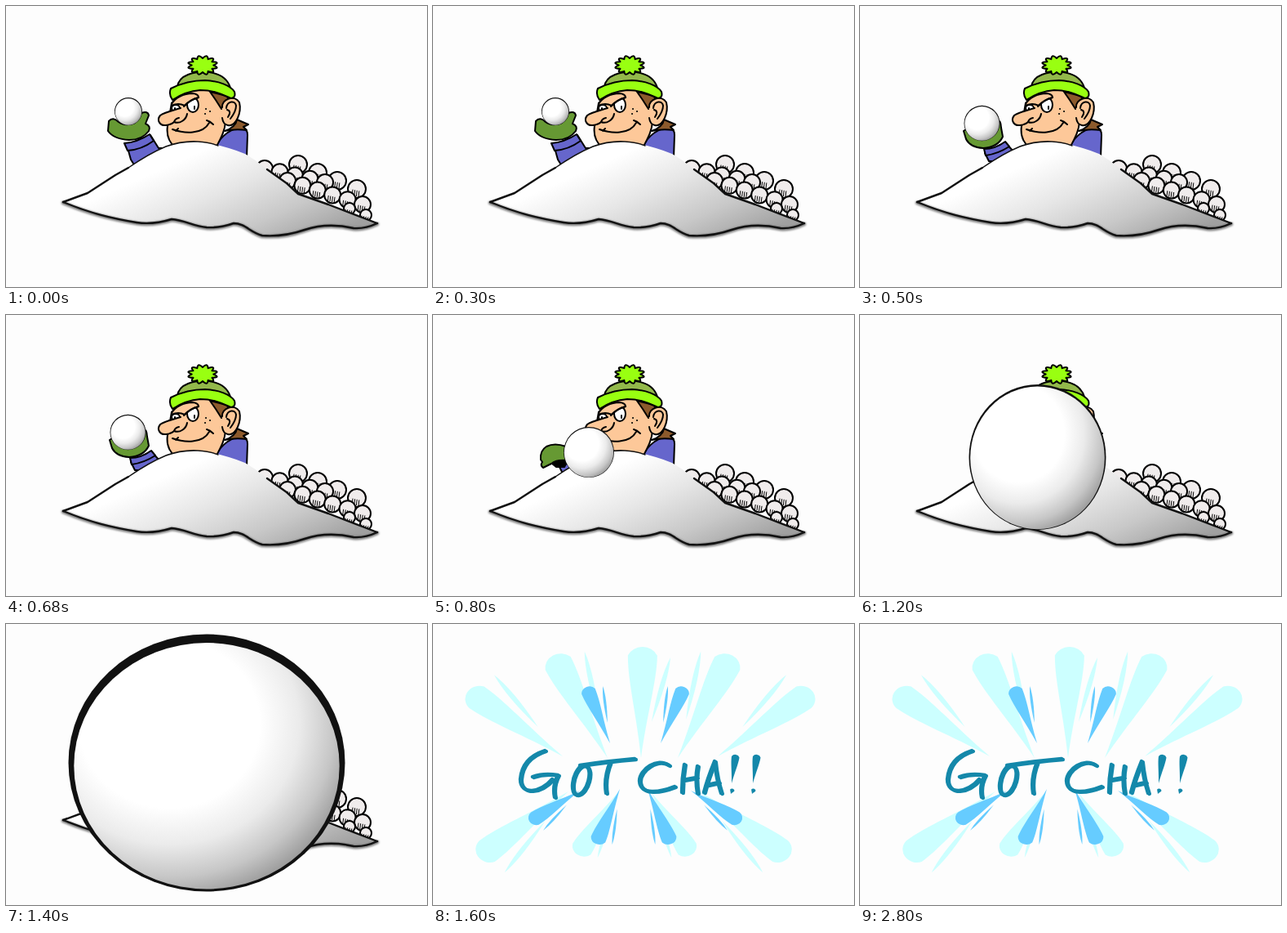
These frames come from a looping animation (516 by 344 pixels, 3.6 s). An HTML page:

```html
<!DOCTYPE html>
<html lang="en">
<head>
<meta charset="utf-8">
<title>Snowball</title>
<style>
html, body { margin: 0; width: 100%; height: 100%; overflow: hidden; background: #fdfdfd; }
svg { display: block; width: 100%; height: 100%; }
.ink { stroke: #000; stroke-width: 2; stroke-linejoin: round; stroke-linecap: round; }
.line { fill: none; }
.skin { fill: #fdc899; }
.coat { fill: #6666cc; }
.glove { fill: #669933; }
.lime { fill: #99ff11; }
.hair { fill: #8c5a2c; }
.brush { fill: none; stroke: #1488aa; stroke-width: 4.4; stroke-linecap: round; stroke-linejoin: round; }
</style>
</head>
<body>
<svg viewBox="0 0 516 344" xmlns="http://www.w3.org/2000/svg">
<defs>
  <linearGradient id="snow" gradientUnits="userSpaceOnUse" x1="235" y1="180" x2="310" y2="350">
    <stop offset="0" stop-color="#fff"/><stop offset=".12" stop-color="#f5f5f5"/>
    <stop offset=".3" stop-color="#e6e6e6"/><stop offset=".58" stop-color="#c8c8c8"/>
    <stop offset=".85" stop-color="#a0a0a0"/>
  </linearGradient>
  <radialGradient id="shade" cx=".36" cy=".33" r=".74">
    <stop offset=".46" stop-color="#fff"/><stop offset=".66" stop-color="#ebebeb"/>
    <stop offset=".84" stop-color="#c6c6c6"/><stop offset="1" stop-color="#949494"/>
  </radialGradient>
  <filter id="soft" x="-5%" y="-20%" width="110%" height="140%"><feGaussianBlur stdDeviation="1"/></filter>
  <path id="base" d="M455 266Q440 273 426 272C404 267 384 268 366 274Q340 283 314 281C299 277 293 266 279 266Q262 272 246 271C229 269 218 262 203 261Q180 268 160 265C130 260 104 254 70 240"/>
  <path id="letters" d="M137 155Q109 164 107 190C107 210 132 207 146 190M122 187Q136 182 153 185Q146 198 149 212
    M182 174C170 181 167 210 177 209C189 208 197 177 187 174Q184 172 179 176
    M180 173Q212 168 247 165M217 169Q209 188 212 207
    M289 173C275 163 253 178 253 192C254 210 278 206 296 199
    M308 172Q305 189 305 206M324 174Q321 190 324 207M306 191L323 188
    M332 206Q336 190 345 168Q347 189 353 207M336 197L350 194"/>
</defs>

<g id="scene">
  <g id="heap" class="ink"></g>

  <g class="ink">
    <path class="coat" d="M254 178C260 163 272 151 287 149Q296 149 296 158L295 186Z"/>
    <path class="hair" d="M268 153Q282 148 283 139L297 145L291 148L295 152Q281 150 268 153Z"/>
    <path class="skin" d="M203 119C212 108 226 101 242 101Q260 104 268 118L269 142C268 154 263 162 257 174L208 174C201 168 196 160 198 147Z"/>
    <path class="hair" d="M250 105L270 110L277 118L267 119L264 126L257 115Z"/>
    <path class="skin" d="M265 124C264 114 280 108 286 118C289 130 282 148 272 146Q266 145 265 137"/>
    <path class="line" d="M270 125C271 116 281 115 282 122C282 129 278 134 275 138M271 127Q277 129 272 136"/>
    <ellipse cx="208" cy="125" rx="5" ry="4" fill="#fff"/>
    <ellipse cx="229" cy="121" rx="7" ry="9" fill="#fff"/>
    <path class="skin" d="M203 120C207 113 217 107 229 107Q236 108 236 112Q225 115 219 122Q211 118 203 122Z"/>
    <path class="line" d="M218 123Q225 115 236 112M231 123v3M207 125v2"/>
    <path class="skin" d="M214 125C204 128 194 130 189 134C184 140 189 147 196 146Q203 145 206 142C213 145 221 139 222 132"/>
    <path class="line" d="M206 142Q207 138 212 137M204 151C218 156 241 158 249 143M246 140Q250 141 254 145M208 153L211 150M245 126h.1M250 129h.1M244 132h.1"/>
    <path d="M210 99C212 84 230 80 249 81Q270 84 275 100Z" fill="#93b94b"/>
    <path class="lime" d="M202 101C216 94 228 91 244 91C261 92 275 97 280 105Q282 112 276 113C264 108 254 103 238 103C224 104 213 109 204 115Q199 108 202 101Z"/>
    <path id="pom" class="lime"/>
  </g>

  <g id="arms" class="ink">
    <g>
      <path class="coat" d="M148 170L177 158L187 174L198 174L158 196L153 188Z"/>
      <path class="coat" d="M145 168Q161 167 176 157L181 165Q166 176 149 177Z"/>
      <path class="glove" d="M126 141Q131 135 138 142Q146 148 158 143L166 131Q174 128 175 134L171 144Q178 147 175 153Q167 164 151 164Q132 163 125 153Z"/>
    </g>
    <g>
      <path class="coat" d="M153 180L178 167L189 179L168 190L158 190Z"/>
      <path class="coat" d="M152 175Q166 175 178 166L183 172Q169 181 154 183Z"/>
      <path class="glove" d="M127 153Q134 147 148 150L165 138Q173 139 173 149L175 160Q169 173 151 174Q135 173 130 163Z"/>
    </g>
    <g>
      <path class="coat" d="M152 180L166 176L190 185L159 194Z"/>
      <path d="M146 182Q154 177 165 179L161 186L151 186Z"/>
      <path class="glove" d="M132 177Q131 166 139 161Q149 156 163 161L164 178Q151 177 145 182L135 187Q131 184 134 180Z"/>
    </g>
  </g>

  <g fill="none" stroke="#111" stroke-width="2.4" stroke-linejoin="round" stroke-linecap="round">
    <path fill="url(#snow)" stroke="none" d="M70 240L100 229L134 207L150 198C166 187 184 177 196 172Q215 165 235 166Q262 169 293 181Q304 187 320 200L344 217L358 230L395 243L455 266Q440 273 426 272C404 267 384 268 366 274Q340 283 314 281C299 277 293 266 279 266Q262 272 246 271C229 269 218 262 203 261Q180 268 160 265C130 260 104 254 70 240Z"/>
    <use href="#base" y="1" stroke="#555" stroke-width="4.5" opacity=".75" filter="url(#soft)"/>
    <use href="#base"/>
    <path d="M70 240L100 229L134 207L150 198M320 200L344 217L358 230L395 243L455 266"/>
    <path d="M150 198C166 187 184 177 196 172Q215 165 235 166Q250 167 260 171" stroke-width="1.5"/>
  </g>

  <ellipse id="rim" fill="#111"/>
  <ellipse id="ball" fill="url(#shade)"/>
</g>

<g id="splash" role="img" aria-label="GOTCHA!!">
  <g id="drops"></g>
  <use href="#letters" class="brush"/>
  <use href="#letters" class="brush" x="1.8" y="1"/>
</g>
</svg>

<script>
const $ = id => document.getElementById(id);
const set = (el, attrs) => Object.entries(attrs).forEach(([k, v]) => el.setAttribute(k, v));
const LIGHT = '#ccffff', BLUE = '#66ccff', TEAL = '#1488aa';

function add(parent, tag, attrs) {
  const el = document.createElementNS('http://www.w3.org/2000/svg', tag);
  set(el, attrs);
  parent.appendChild(el);
}

// A straight row of n hatched snowballs
function row(n, x0, y0, x1, y1, r) {
  for (let i = 0; i < n; i++) {
    const x = x0 + (x1 - x0) * i / (n - 1), y = y0 + (y1 - y0) * i / (n - 1);
    add($('heap'), 'circle', { cx: x, cy: y, r, fill: '#f0ecec' });
    let d = '';
    for (let k = 0; k < 4; k++) d += `M${x - 5 + k * 2.6} ${y + 1 + k * .6}l-.8 ${r * .6}`;
    add($('heap'), 'path', { d, 'stroke-width': 1, style: 'stroke-width:1' });
  }
}
row(4, 358, 194, 430, 224, 11);
row(5, 317, 199, 391, 216, 10);
row(6, 345, 214, 437, 243, 10);
row(2, 421, 248, 441, 256, 7);

// Hat bobble: a ring of bumps
function bobble(cx, cy, rx, ry, n) {
  const at = (i, k) => {
    const a = i / n * 2 * Math.PI;
    return `${cx + rx * k * Math.cos(a)} ${cy + ry * k * Math.sin(a)}`;
  };
  let d = 'M' + at(0, .74);
  for (let i = 0; i < n; i++) d += `Q${at(i + .5, 1.3)} ${at(i + 1, .74)}`;
  return d + 'Z';
}
set($('pom'), { d: bobble(241, 72.5, 18, 11.5, 12) });

// Teardrop from its tip along (dx, dy) to a round end
function drop(fill, x, y, dx, dy, r) {
  const len = Math.hypot(dx, dy);
  const at = (f, s) => `${x + dx * f - dy / len * s * r} ${y + dy * f + dx / len * s * r}`;
  add($('drops'), 'path', { fill, d:
    `M${x} ${y}C${at(.4, .35)} ${at(.72, 1)} ${at(.95, 1)}A${r * 1.1} ${r} 0 0 0 ${at(.95, -1)}C${at(.72, -1)} ${at(.4, -.35)} ${x} ${y}Z` });
}

// A drop with a thin splinter turned a little to its side
function spray(fill, x, y, dx, dy, r, side = 1) {
  drop(fill, x, y, dx, dy, r);
  const a = side * .27, c = Math.cos(a), s = Math.sin(a);
  const ux = dx * c - dy * s, uy = dx * s + dy * c;
  const w = side * .045;
  const at = (f, k) => `${x + ux * f - uy * k} ${y + uy * f + ux * k}`;
  add($('drops'), 'path', { fill, d: `M${at(.35, 0)}Q${at(.75, w)} ${at(.97, 0)}Q${at(.75, -w)} ${at(.35, 0)}Z` });
}

// Two sprays mirrored left and right of the axis
function pair(fill, axis, gap, y, dx, dy, r) {
  const side = Math.sign(-dy);
  spray(fill, axis - gap, y, -dx, dy, r, side);
  spray(fill, axis + gap, y, dx, dy, r, -side);
}
pair(LIGHT, 254, 95, 162, 111, -76, 16);
pair(LIGHT, 257, 43, 164, 64, -122, 17.5);
spray(LIGHT, 255, 164, 2, -132, 18);
pair(LIGHT, 246, 80, 205, 105, 77, 16);
pair(LIGHT, 247, 21, 207, 46, 72, 13);
pair(BLUE, 248, 31, 146, 28, -67, 9);
pair(BLUE, 248, 68, 204, 58, 36, 9);
pair(BLUE, 246, 17, 202, 28, 65, 9.5);

// Exclamation marks
for (const x of [366, 392]) {
  drop(TEAL, x, 195, 5, -34, 4.8);
  drop(TEAL, x - 1, 208, 2, -5, 2.8);
}

// Each pose: duration, then the ball as cx, cy, rx, ry
const poses = [
  [500, 150, 129, 17, 17],
  [300, 149.5, 143.5, 22, 21.7],
  [200, 191, 168, 31, 31],
  [200, 218, 173.5, 56, 54.5],
  [200, 217.5, 174, 84, 89],
  [200, 246, 170, 169.5, 157.5],
  [2000]
];
const LOOP = poses.reduce((sum, p) => sum + p[0], 0);
const show = (el, on) => set(el, { display: on ? 'inline' : 'none' });

function draw(ms) {
  let step = 0;
  while (ms >= poses[step][0]) ms -= poses[step++][0];
  const [, cx, cy, rx, ry] = poses[step];
  show($('scene'), rx);
  show($('splash'), !rx);
  if (!rx) return;
  [...$('arms').children].forEach((arm, i) => show(arm, i === step));
  // The line gets heavier, most of all on top, as the ball comes closer
  const w = Math.max(.8, (rx / 65) ** 2);
  set($('rim'), { cx, cy, rx, ry });
  set($('ball'), { cx, cy: cy + w * .55, rx: rx - w, ry: ry - w });
}

const t0 = performance.now();
function tick() {
  draw((performance.now() - t0) % LOOP);
  requestAnimationFrame(tick);
}
tick();
</script>
</body>
</html>
```
